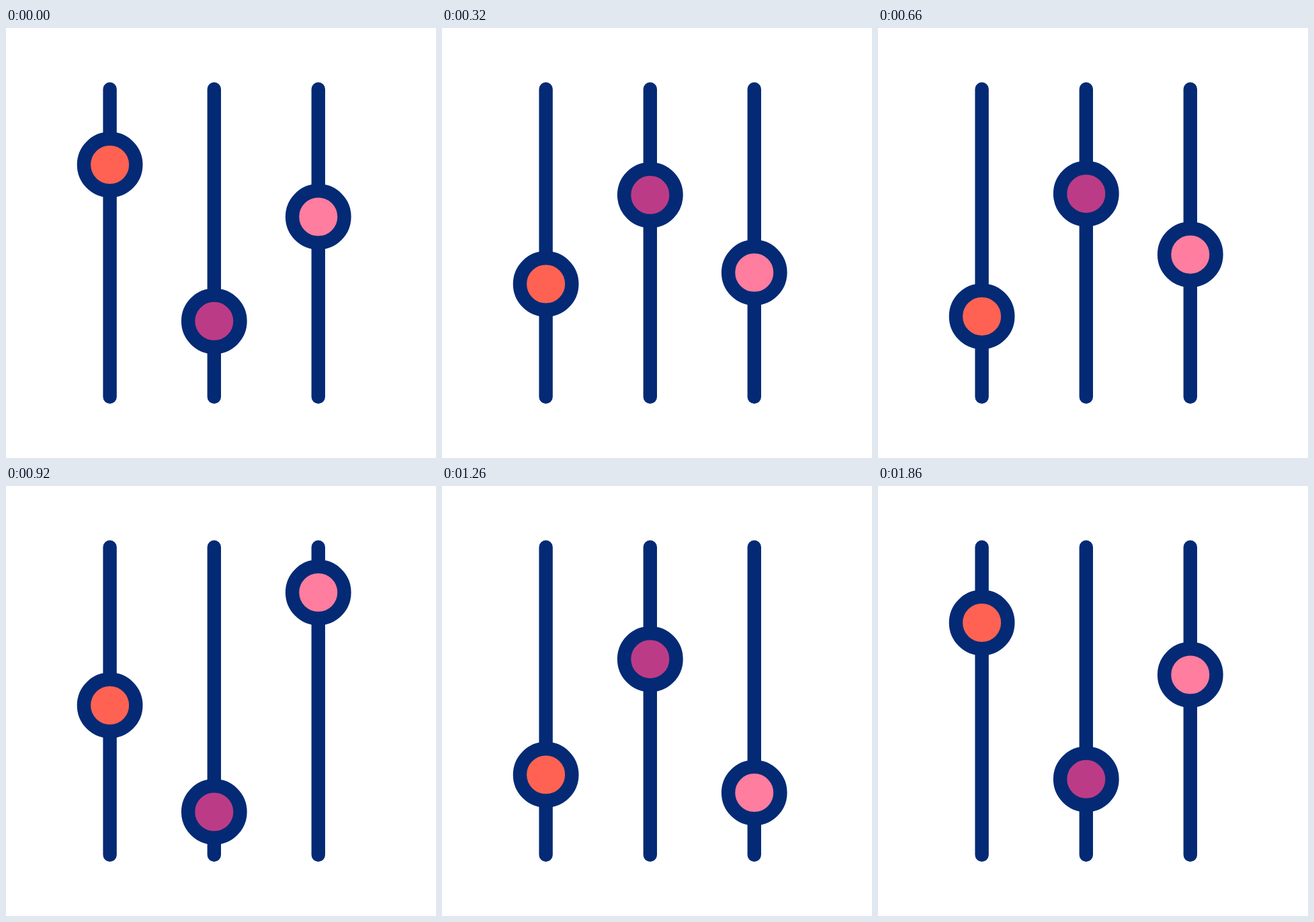
An HTML page for the animation above (2.08 s loop, 640 px wide and 640 px high).

```html
<!DOCTYPE html>
<html lang="en">
<head>
<meta charset="utf-8">
<title>Sliders</title>
<style>
html, body { margin: 0; height: 100%; overflow: hidden; background: #fff; }
svg { display: block; width: 100%; height: 100%; }
</style>
</head>
<body>
<svg viewBox="0 0 640 640" stroke="#042a75" stroke-width="20.4" stroke-linecap="round">
  <path d="M154.6 91V549M309.8 91V549M464.8 91V549"/>
  <circle cx="154.6" cy="203.5" r="38.7" fill="#ff6252"/>
  <circle cx="309.8" cy="436.3" r="38.7" fill="#bc3b86"/>
  <circle cx="464.8" cy="281" r="38.7" fill="#ff7d9f"/>
</svg>
<script>
const LOOP = 2080;
const KEYS = [0, 8, 14, 20, 27]; // in steps of 1/15 s
const STOPS = [
  [203.5, 468, 326.5, 439.6, 203.5],
  [436.3, 156.6, 485, 236, 436.3],
  [281, 404.7, 158.5, 485, 281]
];
const knobs = document.querySelectorAll('circle');

// Symmetric cubic Bezier ease with handles at (.28, 0) and (.72, 1)
function ease(x) {
  let lo = 0, hi = 1;
  for (let i = 0; i < 24; i++) {
    const t = (lo + hi) / 2, s = 1 - t;
    if (0.84 * t * s * s + 2.16 * t * t * s + t * t * t < x) lo = t;
    else hi = t;
  }
  return lo * lo * (3 - 2 * lo);
}

// Steps fall at 0, 60 and 120 ms of every 200 ms
function stepAt(ms) {
  const rest = ms % 200;
  return 3 * Math.floor(ms / 200) + (rest >= 60) + (rest >= 120);
}

function draw() {
  const step = Math.min(stepAt(performance.now() % LOOP), KEYS[4]);
  const i = Math.min(KEYS.findLastIndex(k => k <= step), 3);
  const f = ease((step - KEYS[i]) / (KEYS[i + 1] - KEYS[i]));
  STOPS.forEach((y, n) => knobs[n].setAttribute('cy', y[i] + (y[i + 1] - y[i]) * f));
  requestAnimationFrame(draw);
}
draw();
</script>
</body>
</html>
```
